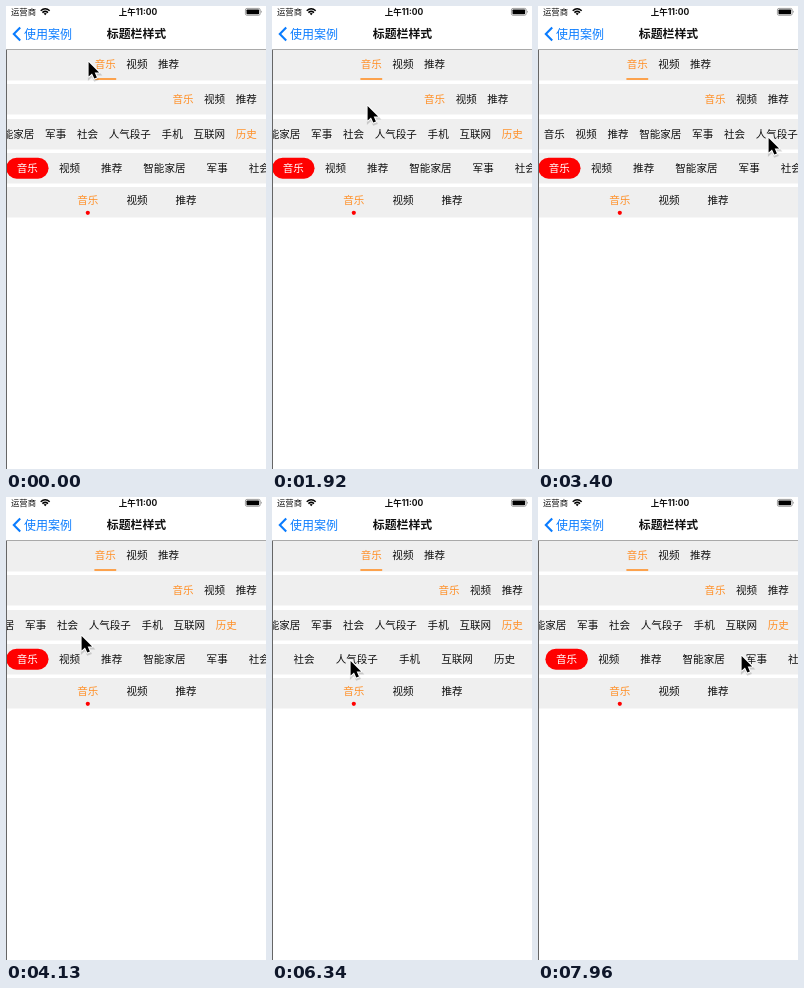
Animation, 260 px wide and 463 px high, one loop 8000 ms. Source, as an HTML page:

```html
<!DOCTYPE html>
<html lang="zh-CN">
<head>
<meta charset="utf-8">
<title>标题栏样式</title>
<style>
html, body { margin: 0; width: 100%; height: 100%; overflow: hidden; background: #fff; }
svg { display: block; width: 260px; height: 463px; }
text { font: 10.55px "Noto Sans CJK SC", "Noto Sans CJK", "Noto Sans", sans-serif; fill: #111; }
.on { fill: #ff8f26; }
.pill { fill: #fff; }
.status { font-size: 8.4px; }
.clock { font: 700 8.5px Inter, "Noto Sans CJK SC", "Noto Sans CJK", sans-serif; text-anchor: middle; }
.back { font-size: 12px; fill: #0a7cff; }
.title { font-size: 11.9px; font-weight: 700; text-anchor: middle; }
</style>
</head>
<body>
<svg viewBox="0 0 260 463">
  <rect width="260" height="463" fill="#fff"/>

  <text class="status" x="5" y="9.2">运营商</text>
  <g fill="none" stroke="#000" stroke-width="1.5">
    <path d="M34.7 4.7Q39.2 .7 43.7 4.7"/>
    <path d="M36.4 6.6Q39.2 4.2 42 6.6"/>
  </g>
  <path d="M37.6 7.5Q39.2 6.4 40.8 7.5L39.2 9.2Z"/>
  <text class="clock" x="132" y="9.2">上午11:00</text>
  <rect x="239.4" y="2.4" width="14.8" height="6.9" rx="1.6" fill="none" stroke="#777" stroke-width=".7"/>
  <rect x="240.5" y="3.5" width="12.6" height="4.7" rx=".7"/>
  <path d="M255 4.6q1.5 1.2 0 2.5z" fill="#777"/>

  <path d="M14.2 21.4L7.8 28L14.2 34.6" fill="none" stroke="#0a7cff" stroke-width="2.1"/>
  <text class="back" x="18" y="32.8">使用案例</text>
  <text class="title" x="130.5" y="32.4">标题栏样式</text>
  <rect y="43" width="260" height="1" fill="#a9a9a9"/>

  <g id="bands" fill="#efefef"></g>
  <rect x="88.4" y="72.2" width="21.8" height="1.6" class="on"/>
  <g id="rows"></g>
  <circle cx="81.8" cy="206.8" r="2.1" fill="#f00"/>
  <rect y="44" width="1" height="419" fill="#666"/>

  <g id="cursor">
    <path d="M1 2.4V17.4L4.4 14.3L6.7 19.4L9.4 18.3L7.2 13.3H11.8Z" fill="none" stroke="#000" stroke-width="2.2" stroke-opacity=".16"/>
    <path d="M.6 1V15.6L4 12.5L6.3 17.6L8.9 16.5L6.7 11.5H11.1Z"
          stroke="#fff" stroke-width="2" stroke-linejoin="round" paint-order="stroke"/>
  </g>
</svg>
<script>
const LOOP = 8000, STEP = 147.4, CHAR = 10.55;
const SHORT = ['音乐', '视频', '推荐'];
const LONG = [...SHORT, '智能家居', '军事', '社会', '人气段子', '手机', '互联网', '历史'];
const $ = id => document.getElementById(id);

function add(parent, tag, attrs, text = '') {
  const el = document.createElementNS('http://www.w3.org/2000/svg', tag);
  for (const key in attrs) el.setAttribute(key, attrs[key]);
  el.textContent = text;
  return parent.appendChild(el);
}

// min and max bound how far the row scrolls
function addRow(labels, x, y, { gap = CHAR, active = 0, pill = false, min = 0, max = 0 } = {}) {
  const el = add($('rows'), 'g', {});
  if (pill) add(el, 'rect', { x: x - CHAR, y: 151.7, width: CHAR * 4 + .2, height: 21, rx: 10.5, fill: '#f00' });
  labels.forEach((label, i) => {
    const style = i !== active ? '' : pill ? 'pill' : 'on';
    add(el, 'text', { x, y, class: style }, label);
    x += label.length * CHAR + gap;
  });
  return { el, min, max, offset: 0 };
}

for (let i = 0; i < 5; i++) {
  add($('bands'), 'rect', { y: Math.round(44 + i * 34.3), width: 260, height: 30.5 });
}

addRow(SHORT, 88.7, 61.9);
const right = addRow(SHORT, 166.4, 97.2);
const scroll = addRow(LONG, -109.2, 132, { gap: 10.7, active: 9, max: 118 });
const pills = addRow(LONG, 10.7, 166.2, { gap: CHAR * 2, pill: true, min: -214.6 });
addRow(SHORT, 71.3, 198.4, { gap: 28 });

const movable = [right, scroll, pills];
const hand = { x: 82, y: 55 };
const poses = [];

const clamp = row => Math.min(row.max, Math.max(row.min, row.offset));
const rubber = row => (row.offset + clamp(row)) / 2;

function record() {
  poses.push({ x: Math.round(hand.x), y: Math.round(hand.y), offsets: movable.map(rubber) });
}

// Moves the pointer over some steps; a held row follows, the others spring back
function move(steps, x, y, held) {
  const dx = (x - hand.x) / steps, dy = (y - hand.y) / steps;
  for (let i = 0; i < steps; i++) {
    hand.x += dx;
    hand.y += dy;
    for (const row of movable) {
      if (row === held) row.offset += dx;
      else row.offset = clamp(row) + (row.offset - clamp(row)) * .4;
    }
    record();
  }
}

record();
move(4, 165, 91);
move(8, 93, 90, right);
move(4, 101, 127);
move(1, 132, 124, scroll);
move(2, 134, 123, scroll);
move(3, 216, 128, scroll);
move(1, 230, 131);
move(5, 75, 138, scroll);
move(6, 184, 157);
move(2, 203, 157, pills);
move(3, 80, 161, pills);
move(2, 202, 159);
move(2, 78, 163, pills);
move(3, 85, 165);
move(3, 190, 161, pills);
move(2, 78, 160);
move(3, 203, 158, pills);

function place(el, x, y = 0) {
  el.setAttribute('transform', `translate(${x} ${y})`);
}

function draw(now) {
  const pose = poses[Math.floor((now % LOOP) / STEP)];
  movable.forEach((row, i) => place(row.el, pose.offsets[i]));
  place($('cursor'), pose.x, pose.y);
}

const start = performance.now();
function tick() {
  draw(performance.now() - start);
  requestAnimationFrame(tick);
}
tick();
</script>
</body>
</html>
```
